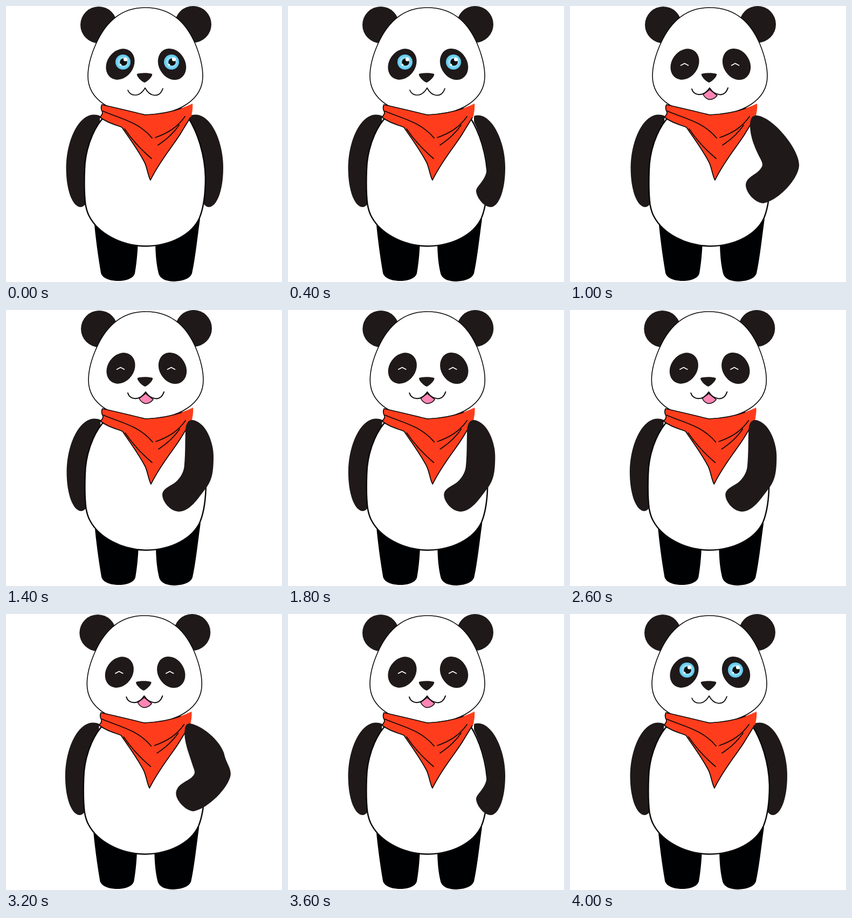
An HTML page for the animation above (4200 ms loop, 512 by 512 pixels).

```html
<!DOCTYPE html>
<html lang="en">
<head>
<meta charset="utf-8">
<title>Waving panda</title>
<style>
html, body { margin: 0; width: 100%; height: 100%; overflow: hidden; background: #fff; }
svg { display: block; width: 100vw; height: 100vh; }
.fur { fill: #1f191a; }
.line { fill: none; stroke: #0a0808; stroke-width: 1.7; stroke-linecap: round; stroke-linejoin: round; }
.white { fill: #fff; stroke: #0a0808; }
</style>
</head>
<body>
<svg viewBox="0 0 512 512">
  <defs>
    <path id="hang" class="fur" d="M340 204C375 189 403 246 403 300C403 345 390 373 376 373C366 373 355 350 345 320Z"/>
    <g id="eye">
      <circle r="14" fill="#67cdef"/>
      <circle r="10.5" fill="#8edcf5"/>
      <circle cx="1" r="6.8" fill="#111"/>
      <circle cx="4.5" cy="-5" r="3.6" fill="#fff"/>
      <circle cx="-4.5" cy="5" r="1.8" fill="#fff"/>
    </g>
    <path id="shut" d="M-7.5 4L0 0L7.500 4" fill="none" stroke="#fff" stroke-width="1.7"/>
  </defs>
  <g id="panda">
    <path d="M163 395C166 430 171 465 176 495C179 507 197 510 208 510C222 510 236 506 239 496C242 478 244 460 245 435Z
             M277 435C277 460 279 480 283 496C286 507 299 511 312 511C327 510 341 507 345 496C351 470 355 430 360 395Z" fill="#000103"/>
    <use href="#hang" transform="matrix(-1 0 0 1 514.500 0)"/>
    <use id="rest" href="#hang"/>
    <path class="white" stroke-width="2.5" d="M178 210C160 232 146.500 268 145.800 305C145 328 145 350 147.500 368C149 377 151 384 155 391C171 421 212 445 260 445.500C306 444.500 345 424 359 393C367 373 370 345 370 318C369 277 356 235 338 207Z"/>
    <circle class="fur" cx="172" cy="35" r="34"/>
    <circle class="fur" cx="347" cy="34" r="34"/>
    <path class="white" stroke-width="1.6" d="M258 3C312 3 337 38 351 70C360 92 365 112 365 130C365 174 320 202 258 202C197 202 152 174 152 130C152 112 158 90 167 70C181 39 207 3 258 3Z"/>
    <path d="M178 183C200 188 231 195 258 202C290 200 322 193 346 181C347 190 345 198 344 204C337 215 331 225 326 233C313 256 287 284 268 323C263 314 262 300 257 290C245 267 232 250 215 225C199 219 187 216 174 206C178 203 179 200 179 197C176 192 176 187 178 183Z" fill="#ff3d1c"/>
    <path class="line" d="M178 183C200 188 231 195 258 202C280 201 305 197 325 190M178 183C176 187 176 192 179 197C179 200 178 203 174 206C187 216 199 219 215 225C232 250 245 267 257 290C262 300 263 314 268 323C287 284 313 256 326 233L342 207"/>
    <path class="line" stroke-width="1.2" d="M180 195C206 207 246 214 271 245M332 205C318 225 300 236 277 244M321 221C310 237 296 249 282 258M220 228C234 249 250 266 270 283"/>
    <path id="arm" class="fur"/>
    <ellipse class="fur" cx="212" cy="108" rx="24.5" ry="30.5" transform="rotate(35 212 108)"/>
    <ellipse class="fur" cx="308" cy="108" rx="24.5" ry="30.5" transform="rotate(-31 308 108)"/>
    <path class="fur" d="M243 126C250 123.500 264 123.500 271 126C273 130 262 141 257 142C252 141 241 130 243 126Z"/>
    <g id="calm">
      <use href="#eye" x="217" y="104"/>
      <use href="#eye" x="307" y="104"/>
      <path class="line" d="M226 156C230 168 248 170 258 152C267 169 285 171 291 153"/>
    </g>
    <g id="happy">
      <use href="#shut" x="211.5" y="106.500"/>
      <use href="#shut" x="305.5" y="106.500"/>
      <path d="M258 155L272 166C268 171 262 174 257 173.500C251 172 248 168 246 164Z" fill="#ff85b4" stroke="#0a0808" stroke-width="1.5"/>
      <path class="line" style="stroke-width:2" d="M225 154C228 166 246 170 258 152C268 167 286 170 292 152"/>
    </g>
  </g>
</svg>
<script>
const $ = id => document.getElementById(id);
const arms = {
  A: "",
  B: "M345 204C375 194 403 247 403 300C403 345 390 373 376 373C362 373 349 353 349 343C349 334 369 322 369 300C369 275 355 235 345 215Z",
  C: "M345 203C375 205 424 265 424 295C424 320 385 362 357 366C340 364 325 345 325 332C326 318 340 315 350 305C358 296 357 293 352 283C345 270 333 245 333 222C333 210 336 203 345 203Z",
  D: "M345 204C370 208 384 245 384 272C384 305 380 318 368 333C355 350 340 374 319 374C303 373 289 355 289 343C289 333 300 328 310 322C320 315 328 303 329.500 291C332 265 331 245 332 222C333 210 337 204 345 204Z",
  E: "M343 203C370 208 403 240 407 262C411 278 419 285 418.500 298C416 321 376 362 349 366C333 364 317 345 317 333C318 316 335 312 345 304C353 297 353 294 349 284C342 262 333 240 333 222C333 210 335 203 343 203Z"
};
const STEP = 200;
const poses = "AABDDCBDDDECBDDDEBBBA";
const sway = [0, 0, 0, .5, 1, 1, 1, 1, .3, .3, .3, 1, 0, -.7, -.7, -1.2, -1.7, -1.7, 0, 0, 0];

function draw(ms) {
  const i = Math.floor(ms / STEP) % poses.length;
  const smiling = i >= 3 && i <= 18;
  const hanging = poses[i] === "A";
  $("arm").setAttribute("d", arms[poses[i]]);
  $("rest").style.display = hanging ? "" : "none";
  $("calm").style.display = smiling ? "none" : "";
  $("happy").style.display = smiling ? "" : "none";
  $("panda").setAttribute("transform", `translate(${sway[i]} 0)`);
}

const start = performance.now();
function tick() {
  draw(performance.now() - start);
  requestAnimationFrame(tick);
}
tick();
</script>
</body>
</html>
```
